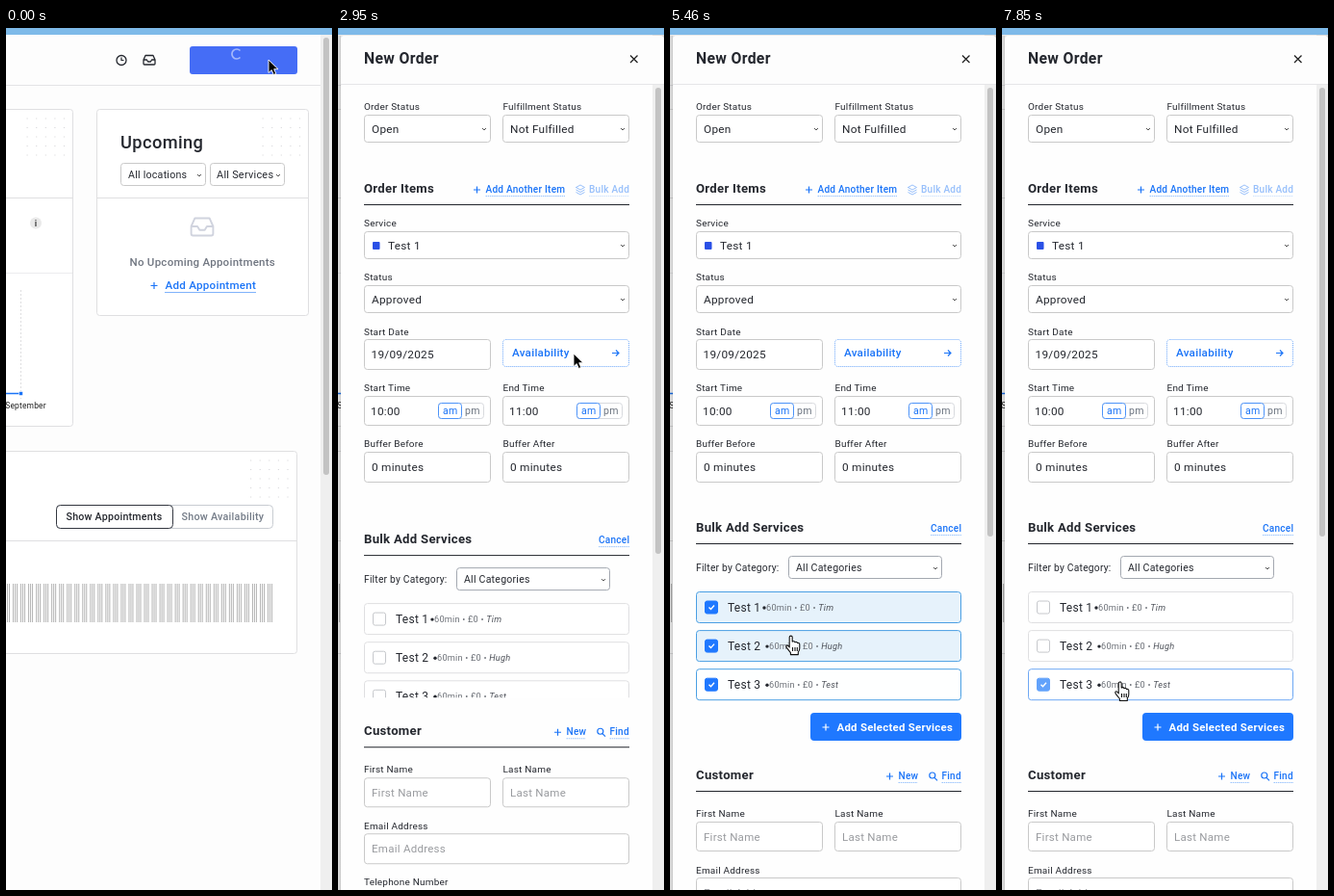
Recreate the animation shown at these times as an HTML page. Size 339 by 895 pixels, loop 8000 ms.

```html
<!DOCTYPE html>
<html lang="en">
<head>
<meta charset="utf-8">
<title>New Order</title>
<style>
html, body { margin: 0; width: 100%; height: 100%; overflow: hidden; background: #fdfdfd; }
svg { display: block; width: 339px; height: 895px; }
text { font-family: Roboto, "Open Sans", sans-serif; letter-spacing: .022em; white-space: pre; }
</style>
</head>
<body>
<svg id="stage" viewBox="0 0 339 895"></svg>
<script>
const INK = '#24272e', BLUE = '#1b74f7', EDGE = '#c9c9c9', SOFT = '#dfdfe1';
const LOOP = 8000, STEP = 148.1;

// ---- drawing helpers, each returns markup ----
const text = (x, y, s, size, fill = INK, weight = 400) =>
  `<text x="${x}" y="${y - .3}" font-size="${size * .96}" font-weight="${weight}" fill="${fill}">${s}</text>`;
const rect = (x, y, w, h, fill, r = 0, stroke = 'none', extra = '') =>
  `<rect x="${x}" y="${y}" width="${w}" height="${h}" rx="${r}" fill="${fill}" stroke="${stroke}" ${extra}/>`;
const path = (d, stroke, width = 1, extra = '') =>
  `<path d="${d}" fill="none" stroke="${stroke}" stroke-width="${width}" ${extra}/>`;
const group = (id, inner, extra = '') => `<g id="${id}" ${extra}>${inner}</g>`;

const label = (x, y, s) => text(x, y, s, 10.4);
const heading = (y, s) => text(27, y, s, 13.7, INK, 700) + path(`M27 ${y + 12.5}H303`, '#22252c');
const chevron = (x, y, c = '#555') => path(`M${x - 2} ${y - 1}l2 2l2 -2`, c);
const plus = (x, y, c = BLUE, r = 3.5) => path(`M${x - r} ${y}h${2 * r}M${x} ${y - r}v${2 * r}`, c, 1.2);
const box = (x, y, w, h) => rect(x + .5, y + .5, w - 1, h - 1, '#fff', 3, EDGE);
const value = (x, y, s) => text(x, y, s, 12.3);
const hint = (x, y, s) => text(x, y, s, 12, '#999b9f');
const link = (x, y, s, end) => text(x, y, s, 10.5, BLUE, 500) +
  path(`M${x} ${y + 3.5}H${end}`, '#9cc5fc', 1, 'stroke-dasharray="1.5 .7"');
const select = (x, y, w, s, tx = x + 8) =>
  box(x, y, w, 29) + value(tx, y + 19, s) + chevron(x + w - 7, y + 15);

function dots(x, y) {
  let d = '';
  for (let i = 0; i < 25; i++) d += `M${x + i % 5 * 9.6} ${y + (i / 5 | 0) * 9.5}h1.2`;
  return path(d, '#d9d9dc', 1.2);
}
function tray(x, y, k, c, w) {
  return path(`M-6 0h3.4l1.2 2h2.8l1.2 -2h3.4M-6 0l2 -4.5h8l2 4.5v4q0 1 -1 1h-10q-1 0 -1 -1z`, c, w,
    `transform="translate(${x} ${y}) scale(${k})" stroke-linejoin="round"`);
}
function scrollbar(y, id, bottom) {
  return rect(327, y, 12, 895 - y, '#efefef') +
    rect(330, y + 3, 6, bottom - y - 3, '#c3c3c3', 3, 'none', `id="${id}"`);
}

// ---- dashboard ----
function dashboard() {
  let bars = '';
  for (let x = 276.5; x > -8; x -= 8.03) bars += `M${x} 577v40m-2 -40v40m-2 -40v40`;
  return rect(0, 7, 339, 888, '#fdfdfd') +
    path('M0 59.5H327', '#e4e4e6') +
    `<circle cx="120" cy="33.5" r="5" fill="none" stroke="${INK}" stroke-width="1.3"/>` +
    path('M120 30.5v3h2.5', INK, 1.2) + tray(149, 33, 1, INK, 1.3) +
    rect(191, 19, 112, 29, '#456df6', 3) +
    path('M243.5 23.5A5 5 0 1 0 243.5 30.5', '#a5b8fb', 1.7, 'id="spin"') +
    // statistics card
    rect(-20, 84.5, 89.5, 329, '#fff', 3, SOFT) + dots(21.5, 94) +
    path('M0 176.5H69', SOFT) + path('M0 254.5H69', '#ececee') +
    '<circle cx="31" cy="202.5" r="6" fill="#e9e9e9"/>' + text(29.8, 206, 'i', 9.5, '#444', 700) +
    path('M15.5 272V385', '#dedee0', 1, 'stroke-dasharray="2 2"') +
    path('M0 379.5H15', BLUE, 1.5) + rect(13.5, 377.5, 4, 4, BLUE, 1, '#fff', 'stroke-width=".6"') +
    text(-.8, 395, 'September', 8.8, '#222') +
    // upcoming card
    rect(94.5, 84.5, 220, 214, '#fff', 3, SOFT) + dots(266.5, 94) +
    text(119, 125.5, 'Upcoming', 19, INK, 500) + path('M95 176.5H314', SOFT) +
    rect(119.5, 140.5, 88, 23, '#fff', 3, EDGE) + text(127, 156, 'All locations', 11.1) + chevron(201, 153) +
    rect(212.5, 140.5, 77, 23, '#fff', 3, EDGE) + text(219, 156, 'All Services', 11.4) + chevron(283, 153) +
    tray(204, 206, 1.9, '#d0d3de', 1) +
    text(128.5, 247.5, 'No Upcoming Appointments', 12, '#707681', 500) +
    plus(154, 267.5) + text(165.5, 271.5, 'Add Appointment', 12.1, BLUE, 500) + path('M165 274.5H260', '#7fb3fb') +
    // calendar card
    rect(-20, 439.5, 322.5, 210, '#fff', 3, SOFT) + dots(254, 449) +
    rect(52.5, 495.5, 225, 24, '#fff', 4, '#c8ccd2') + rect(52.5, 495.5, 121, 24, '#fff', 4, '#333740') +
    text(62.5, 511.5, 'Show Appointments', 11.1, INK, 500) + text(182.5, 511.5, 'Show Availability', 11.2, '#747c88', 500) +
    path('M0 532.5H302', SOFT) + path(bars, '#b4b4b4') +
    scrollbar(7, 'pageThumb', 464);
}

// ---- drawer ----
function timeField(x, s) {
  const am = x + 77;
  return box(x, 382, 132, 31) + value(x + 7, 402.5, s) +
    rect(am + .5, 389.5, 47, 16, '#fff', 3, '#d8dade') + rect(am + .5, 389.5, 24, 16, '#fff', 3, '#4c93f9') +
    text(am + 5, 401.5, 'am', 11, BLUE) + text(am + 28, 401.5, 'pm', 11, '#6c7480');
}
function orderPart() {
  return label(27, 85, 'Order Status') + label(171.5, 85, 'Fulfillment Status') +
    select(27, 90, 132, 'Open') + select(171, 90, 132, 'Not Fulfilled') +
    heading(171, 'Order Items') + plus(144.5, 168) + link(153.5, 171, 'Add Another Item', 236) +
    group('bulkLink', path('M247.5 165.5l4.5 -2.5l4.5 2.5l-4.5 2.5zM247.5 168l4.5 2.5l4.5 -2.5M247.5 170.5l4.5 2.5l4.5 -2.5', BLUE) +
      link(261, 171, 'Bulk Add', 303)) +
    label(27, 206, 'Service') + select(27, 211, 276, 'Test 1', 52) + rect(36, 222, 7.5, 8, '#2a50e6', 1) +
    label(27, 262, 'Status') + select(27, 267, 276, 'Approved') +
    label(27, 319, 'Start Date') + box(27, 323, 132, 32) + value(34.5, 343, '19/09/2025') +
    rect(171.5, 323.5, 131, 28, '#fff', 3, '#6ea8fa', 'stroke-dasharray="1 1"') +
    text(181, 341.5, 'Availability', 12.1, BLUE, 500) + path('M285 337.5h7m-3 -3l3 3l-3 3', BLUE, 1.2) +
    label(27, 377, 'Start Time') + label(171.5, 377, 'End Time') + timeField(27, '10:00') + timeField(171, '11:00') +
    label(27, 435, 'Buffer Before') + label(171.5, 435, 'Buffer After') +
    box(27, 440, 132, 32) + box(171, 440, 132, 32) + value(35, 460.5, '0 minutes') + value(179, 460.5, '0 minutes');
}
function serviceRow(i, who) {
  const y = 585.5 + i * 40.1, x = i ? 103 : 100;
  return rect(27.5, y, 275, 32, '#fff', 3, SOFT, `id="row${i}"`) +
    rect(36.5, y + 9.5, 13, 13, '#fff', 2, '#c6c8cc', `id="check${i}"`) +
    path(`M40.5 ${y + 16}l2 2l3.5 -4`, '#fff', 1.4, `id="tick${i}"`) +
    text(60, y + 20.5, 'Test ' + (i + 1), 12.5) + `<circle cx="${x - 2}" cy="${y + 16.5}" r="1.7" fill="${INK}"/>` +
    text(x, y + 19.5, `60min • £0 • <tspan font-style="italic" fill="#4c5058">${who}</tspan>`, 9.6, '#6d7178');
}
function bulkPart() {
  return heading(523, 'Bulk Add Services') + link(271, 523, 'Cancel', 303) +
    text(27, 564, 'Filter by Category:', 10.7) + rect(123.5, 548.5, 159, 23, '#fff', 3, '#a3a8b0') +
    text(131, 564, 'All Categories', 11) + chevron(276, 561) +
    ['Tim', 'Hugh', 'Test'].map((who, i) => serviceRow(i, who)).join('') +
    rect(146, 711, 157, 29, '#1f78ff', 4) + plus(162, 726, '#fff') +
    text(173.5, 730.5, 'Add Selected Services', 11.9, '#fff', 600);
}
function flag() {
  let d = '';
  for (let y = 695; y < 705; y += 2.4) d += `M34 ${y}h15.5`;
  return rect(34, 694, 15.5, 11, '#f3e4e6') + path(d, '#d0455a', 1.2) + rect(34, 694, 7, 6, '#46568c');
}
function notes(y, s) {
  return label(27, y - 5, s) + box(27, y, 276, 29.5) + hint(35, y + 19, s) +
    path(`M292 ${y + 27}l9 -9M296 ${y + 27}l5 -5`, '#777', .9);
}
function customerPart() {
  return rect(3, 490, 324, 700, '#fefefe') +
    heading(523, 'Customer') + plus(228.5, 520) + link(237.5, 523, 'New', 257.5) +
    `<circle cx="272.8" cy="519" r="3" fill="none" stroke="${BLUE}" stroke-width="1.2"/>` +
    path('M275 521.3l3 3', BLUE, 1.2) + link(282.5, 523, 'Find', 303) +
    label(27, 562, 'First Name') + label(171.5, 562, 'Last Name') + box(27, 567, 132, 31) + box(171, 567, 132, 31) +
    hint(35, 587.5, 'First Name') + hint(179, 587.5, 'Last Name') +
    label(27, 621, 'Email Address') + box(27, 625, 276, 32) + hint(35, 645.5, 'Email Address') +
    label(27, 679, 'Telephone Number') + box(27, 684, 276, 31) + flag() + value(55.5, 704, '+1') +
    '<path d="M70.5 698.5h5l-2.5 3z" fill="#555"/>' + hint(81, 704, '312-555-0187') +
    notes(742, 'Customer Notes') + notes(798, 'Notes only visible to admins') +
    heading(878, 'Price Breakdown') + link(249, 878, 'Recalculate', 303) +
    path('M235 873.5a4.8 4.8 0 0 1 9 -1v-2.5m0 2.5h-2.5M244.5 876a4.8 4.8 0 0 1 -9 1v2.5m0 -2.5h2.5', BLUE, 1.1);
}
function drawer() {
  return rect(-1, 8, 4, 887, 'url(#shade)') + rect(3, 8, 336, 887, '#fefefe', 4) +
    rect(3, 500, 336, 395, '#fefefe') + orderPart() +
    group('customer', customerPart()) +
    group('bulkClip', group('bulk', bulkPart()), 'clip-path="url(#reveal)"') +
    scrollbar(59, 'thumb', 629) + rect(3, 8, 336, 50, '#fdfdfd', 5) +
    path('M3 58.5H339', '#e6e6e8') + text(27, 37, 'New Order', 16.4, INK, 700) +
    path('M304 28.5l7.5 7.5m0 -7.5l-7.5 7.5', '#222', 1.3);
}
const arrow = '<path d="M0 0V13.5L3.2 10.6L5.3 15.5L7.8 14.4L5.7 9.7H10Z" fill="#000" stroke="#fff" stroke-width=".9"/>';
const hand = '<path d="M-1.8 12V1.5Q-1.8 0 -.3 0T1.2 1.5V6Q3.3 5 3.9 6.6Q6 5.9 6.5 7.5Q8.8 7 8.8 9V13Q8.8 15.5 7.3 17V19.5H-.6V17.5L-4.5 12.6Q-6 10.5 -4.4 9.8Q-3.2 9.5 -1.8 12ZM1.5 12v4M4 12v4M6.3 12v4" fill="#fff" stroke="#111" stroke-width="1.1" stroke-linejoin="round"/>';

stage.innerHTML =
  `<defs><linearGradient id="shade"><stop stop-color="#000" stop-opacity="0"/><stop offset="1" stop-color="#000" stop-opacity=".13"/></linearGradient>
  <clipPath id="reveal"><rect id="window" x="3" y="484" width="324" height="0"/></clipPath></defs>` +
  group('page', dashboard()) + rect(0, 7, 339, 888, '#000', 0, 'none', 'id="dim"') +
  group('drawer', drawer()) + rect(0, 0, 339, 7, '#7ebae9') +
  group('arrow', arrow) + group('hand', hand);

// ---- motion: [time, value, ...] ----
const slide = [[370, 340], [444, 250], [592, 95], [740, 22], [888, 0]];
const open = [[2590, 0], [2666, .2], [2814, .55], [2962, .822], [3110, .95], [3258, 1]];
const fade = [[2590, 1], [2814, .45]];
const pointer = [
  [0, 273, 33], [590, 273, 33], [1184, 196, 121], [1480, 268, 161], [1777, 297, 181], [1925, 297, 183],
  [2220, 284, 170], [2600, 284, 170], [2962, 245, 338], [3260, 214, 530], [3554, 204, 607], [3700, 204, 607],
  [4147, 125, 588], [4300, 125, 588], [4443, 124, 600], [4591, 123, 642], [4880, 123, 642], [5040, 124, 672],
  [5330, 124, 674], [5480, 126, 631], [5628, 126, 621], [5780, 126, 621], [6368, 124, 664], [6520, 124, 664],
  [6812, 124, 596], [6960, 124, 596], [7256, 124, 638], [7404, 124, 638], [7701, 123, 676], [7849, 123, 679]
];
const hands = [[2060, 2780], [3400, LOOP]];
const hovers = [[3500, 0], [4550, 1], [4930, 2], [5475, -1], [5560, 1], [6190, 2], [6560, 1], [6700, 0], [7080, 1], [7540, 2], [LOOP, -1]];
const checked = [[4430, 6950], [4870, 7390], [5170, LOOP]];

function at(table, t, col = 1) {
  const i = table.findIndex(k => k[0] > t);
  if (i < 0) return table[table.length - 1][col];
  if (i === 0) return table[0][col];
  const a = table[i - 1], b = table[i];
  return a[col] + (b[col] - a[col]) * (t - a[0]) / (b[0] - a[0]);
}
const within = (t, [a, b]) => t >= a && t < b;
const $ = id => document.getElementById(id);
const set = (id, attrs) => { for (const k in attrs) $(id).setAttribute(k, attrs[k]); };
const mix = (a, b, p) => `rgb(${a.map((v, i) => Math.round(v + (b[i] - v) * p))})`;

function drawRow(i, t) {
  const on = within(t, checked[i]);
  let hover = false, left = -LOOP;
  for (let k = 0; k < hovers.length - 1; k++) {
    if (hovers[k][1] !== i) continue;
    if (within(t, [hovers[k][0], hovers[k + 1][0]])) hover = true;
    else if (hovers[k + 1][0] <= t) left = hovers[k + 1][0];
  }
  const tint = hover ? 0 : Math.min(1, (t - left) / 150);
  set('row' + i, {
    fill: on ? mix([255, 255, 255], [230, 242, 251], tint) : hover ? '#f7fbfd' : '#fff',
    stroke: on ? (hover ? '#6ea8f4' : '#4a9fe3') : hover ? '#a9cfe8' : SOFT
  });
  const blue = hover ? '#62a2fb' : '#1f78ff';
  set('check' + i, { fill: on ? blue : '#fff', stroke: on ? blue : '#c6c8cc' });
  set('tick' + i, { opacity: on ? 1 : 0 });
}

function draw(t) {
  const dx = at(slide, t), p = at(open, t), grow = 257 * p;
  set('spin', { transform: `rotate(${t * .45} 240 27)` });
  set('drawer', { transform: `translate(${dx} 0)` });
  set('dim', { opacity: .08 * (1 - dx / 340) });
  set('window', { height: grow });
  set('bulk', { transform: `translate(0 ${68 * (1 - p)})` });
  set('customer', { transform: `translate(0 ${grow})` });
  set('thumb', { height: 567 - 101 * p });
  set('bulkLink', { opacity: at(fade, t) });
  for (let i = 0; i < 3; i++) drawRow(i, t);
  const isHand = hands.some(h => within(t, h));
  const spot = `translate(${at(pointer, t)} ${at(pointer, t, 2)})`;
  set('arrow', { transform: spot, opacity: isHand ? 0 : 1 });
  set('hand', { transform: spot, opacity: isHand ? 1 : 0 });
}

let start;
function tick(now) {
  start ??= now;
  const t = (now - start) % LOOP;
  draw(Math.min(53, Math.floor((t + 22) / STEP)) * STEP);
  requestAnimationFrame(tick);
}
draw(0);
requestAnimationFrame(tick);
</script>
</body>
</html>
```
